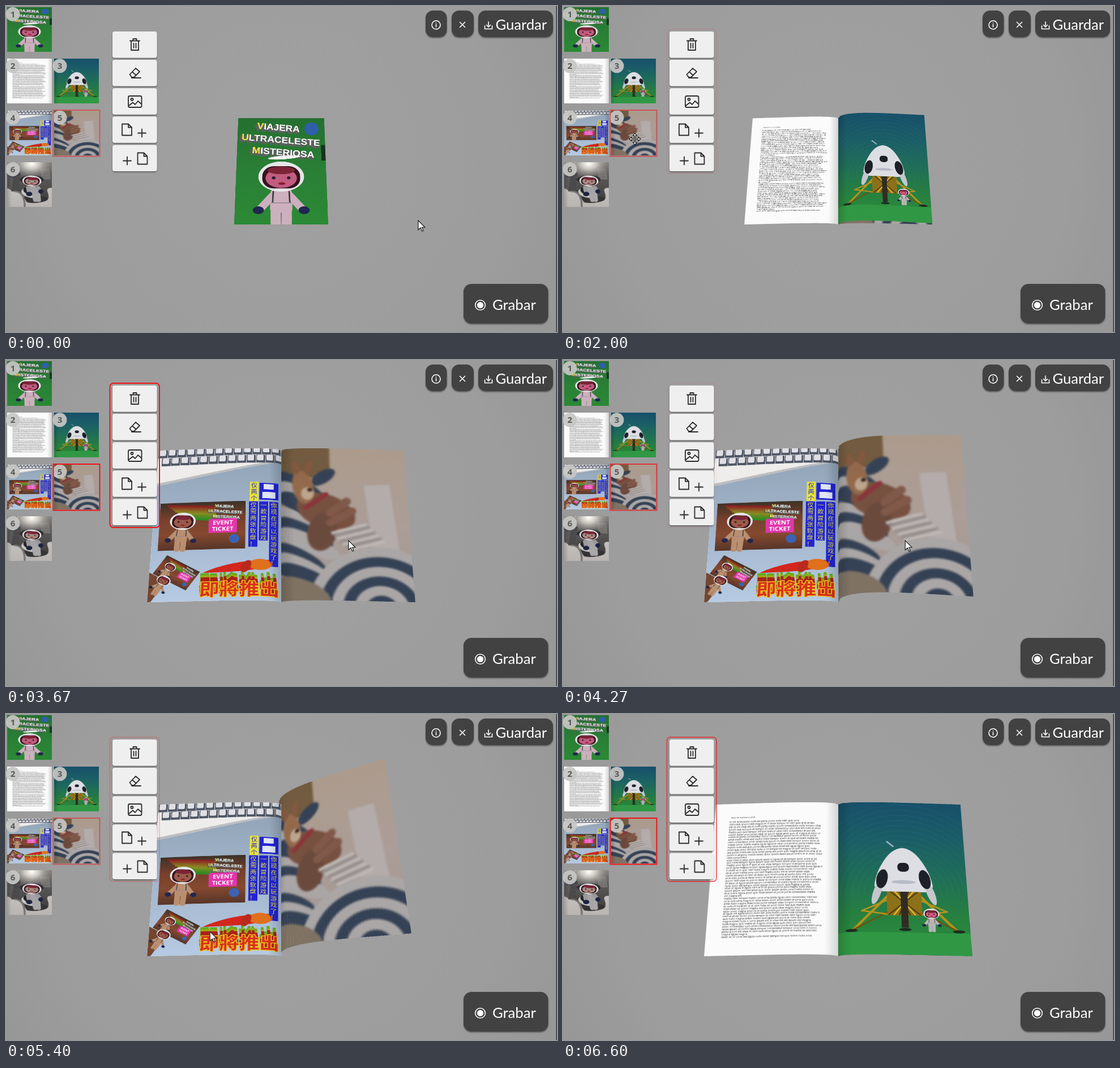
Recreate the animation shown at these times as an HTML page with a canvas. Size 973x576 px, loop 6.67 s.

```html
<!DOCTYPE html>
<html lang="es">
<head>
<meta charset="utf-8">
<title>Editor de libro</title>
<style>
html,body{margin:0;width:100%;height:100%;overflow:hidden;background:#9c9c9c}
canvas,svg{position:absolute;left:0;top:0;display:block}
.big{font:25.6px Lato,"Open Sans",sans-serif;fill:#fff}
.num{font:700 15px "Open Sans",sans-serif;fill:#585858;text-anchor:middle}
.ico{fill:none;stroke:#2b2b2b;stroke-width:1.8;stroke-linejoin:round;stroke-linecap:round}
.lite{fill:none;stroke:#fff;stroke-width:1.6;stroke-linecap:round}
.red{fill:none;stroke:#f01418;stroke-width:2}
</style>
</head>
<body>
<canvas id="stage" width="973" height="576"></canvas>
<svg width="973" height="576">
  <defs>
    <filter id="sh" x="-20%" y="-20%" width="140%" height="150%"><feDropShadow dx="0" dy="1.5" stdDeviation="1.2" flood-opacity=".45"/></filter>
    <path id="sheet" d="M-8-10H3L9-4V10H-8ZM3-10V-4H9"/>
    <path id="plus" d="M-7 0H7M0-7V7"/>
    <path id="arm" d="M-1 0V-6H-3.500L0-10L3.500-6H1V0"/>
  </defs>
  <g id="badges"></g>
  <rect id="pick" class="red" x="83.5" y="184" width="82" height="81.5"/>
  <rect id="frame" class="red" x="183.5" y="41" width="87.5" height="255" rx="6"/>
  <g id="tools" fill="#efefef" filter="url(#sh)"></g>
  <g class="ico">
    <path d="M219 61.500H236M224.500 61V58H230.500V61M221 62V78H234V62M225.500 66V74M229.500 66V74"/>
    <path d="M218.500 121L229 110L236 116L226 126H222ZM223 116.500L230 122.500M222 127H238"/>
    <rect x="216" y="159" width="23.500" height="20" rx="2.500"/><circle cx="222.500" cy="165" r="2"/><path d="M217 176L224 170.500L228 174L233 168L239 173"/>
    <use href="#sheet" x="213" y="218.500"/><use href="#plus" x="240" y="224.500"/>
    <use href="#plus" x="214" y="273.500"/><use href="#sheet" x="240.500" y="269.500"/>
  </g>
  <g fill="#434343" filter="url(#sh)">
    <rect x="741" y="8" width="37.500" height="47" rx="13"/><rect x="787" y="8" width="39" height="47" rx="13"/>
    <rect x="834" y="8" width="132" height="47" rx="13"/><rect x="808" y="491" width="149.500" height="70" rx="14"/>
  </g>
  <g class="lite">
    <circle cx="759.500" cy="33.500" r="7.500"/><path d="M759.500 32.500V37M759.500 29.700V30"/>
    <path d="M801.500 28.500L810.500 37.500M810.500 28.500L801.500 37.500"/>
    <path d="M845.500 35V40.500H858.500V35M852 28V36.500M848.500 33.500L852 37L855.500 33.500"/>
    <circle cx="837.500" cy="528.500" r="8.800"/><circle cx="837.500" cy="528.500" r="4.800" fill="#fff"/>
  </g>
  <text class="big" x="864.500" y="41.800">Guardar</text><text class="big" x="859" y="536.800">Grabar</text>
  <rect x="971.500" width="1.500" height="576" fill="#3a3a3a"/>
  <g id="cursor" fill="#fff" stroke="#111" stroke-width="1.1">
    <path id="arrow" d="M0 0V16.500L4 12.800L6.600 18.800L9 17.800L6.500 12H11.800Z"/>
    <g id="move"></g>
  </g>
</svg>
<script>
const LOOP = 6670, TW = 300, TH = 410, W = 237, H = 324;
const $ = id => document.getElementById(id);
const ctx = $('stage').getContext('2d');
const CJK = '"Noto Sans CJK SC","Noto Sans CJK TC","Noto Sans CJK JP",sans-serif';
const times = (n, fn) => Array.from({ length: n }, (_, i) => fn(i));
const both = fn => [-1, 1].forEach(fn);
let seed = 7;
const rnd = () => (seed = (seed * 16807) % 2147483647) / 2147483647;

// drawing helpers
function surface(w, h, paint) {
  const c = document.createElement('canvas');
  c.width = w; c.height = h;
  paint(c.getContext('2d'));
  return c;
}
function ramp(g, h, ...stops) {
  const r = g.createLinearGradient(0, 0, 0, h);
  stops.forEach((s, i) => r.addColorStop(i / (stops.length - 1), s));
  return r;
}
function box(g, c, x, y, w, h, r = 0) {
  g.fillStyle = c; g.beginPath(); g.roundRect(x, y, w, h, r); g.fill();
}
function oval(g, c, x, y, rx, ry = rx, a = 0) {
  g.fillStyle = c; g.beginPath(); g.ellipse(x, y, rx, ry, a, 0, 7); g.fill();
}
function limb(g, c, w, x0, y0, x1, y1) {
  g.strokeStyle = c; g.lineWidth = w; g.lineCap = 'round';
  g.beginPath(); g.moveTo(x0, y0); g.lineTo(x1, y1); g.stroke();
}
function shape(g, c, d) { g.fillStyle = c; g.fill(new Path2D(d)); }
function at(g, x, y, s, rot, fn) {
  g.save(); g.translate(x, y); g.rotate(rot); g.scale(s, s); fn(g); g.restore();
}
function fill(g, ...stops) { box(g, ramp(g, TH, ...stops), 0, 0, TW, TH); }
function gutter(g, x) {
  const r = g.createLinearGradient(x, 0, Math.abs(x - 30), 0);
  r.addColorStop(0, 'rgba(0,0,0,.16)'); r.addColorStop(1, 'rgba(0,0,0,0)');
  box(g, r, 0, 0, TW, TH);
}

function helmet(g, face) {
  oval(g, '#e6e6e9', 0, 0, 76, 58);
  box(g, '#35141c', -63, -40, 126, 86, 38);
  oval(g, face, 0, 6, 52, 38);
  oval(g, '#7a2436', 0, -24, 46, 15);
  both(s => oval(g, '#22222c', s * 25, 5, 6));
  oval(g, '#8c1f30', 2, 27, 12, 5);
}
function doll(g, suit, face) {
  both(s => {
    limb(g, suit, 27, s * 30, 76, s * 66, 122);
    limb(g, suit, 33, s * 18, 130, s * 17, 190);
    oval(g, '#20264e', s * 74, 130, 18, 15);
  });
  box(g, suit, -36, 50, 72, 90, 14);
  both(s => limb(g, '#3b3942', 5, s * 26, 58, s * 28, 98));
  box(g, '#8f8490', -34, 100, 68, 3);
  helmet(g, face);
}
function title(g) {
  g.textAlign = 'center';
  ['VIAJERA', 'ULTRACELESTE', 'MISTERIOSA'].forEach((word, i) => {
    g.save();
    g.transform(1, .09, -.05, 1, 140 + i * 8, 47 + i * 48);
    g.font = 'bold 34px "Liberation Sans",Arial,sans-serif';
    const left = -g.measureText(word).width / 2;
    g.fillStyle = '#5c625e';
    for (let d = 12; d > 0; d--) g.fillText(word, -d * .7, d * .8);
    g.fillStyle = '#fff'; g.fillText(word, 0, 0);
    g.textAlign = 'left';
    g.fillStyle = '#f5e532'; g.fillText(word[0], left, 0);
    g.restore();
  });
  g.textAlign = 'left';
}

function cover(g) {
  fill(g, '#24702f', '#2a7f36', '#2b8a35');
  box(g, '#17321f', 286, 103, 14, 60);
  title(g);
  oval(g, '#2f5fa8', 255, 41, 25);
  oval(g, '#f4f4f4', 160, 151, 55, 7, -.08);
  at(g, 150, 225, 1, 0, () => doll(g, '#cdb0be', '#c25c80'));
}

function prose(g) {
  fill(g, '#fbfbfb', '#fbfbfb');
  const words = 'lorem ipsum dolor sit amet consectetur elit sed vitae magna tempor nulla at quis nibh porta in urna mattis et ligula'.split(' ');
  g.fillStyle = '#2a2a2a';
  g.font = '5px "Open Sans",sans-serif';
  g.fillText('Nota de la primera salida', 40, 39);
  times(46, i => {
    g.font = '6.2px "Open Sans",sans-serif';
    const limit = i % 15 === 14 ? 70 : 205 + rnd() * 28;
    let line = '', next = '';
    while (g.measureText(next).width < limit) {
      line = next;
      next += words[Math.floor(rnd() * words.length)] + ' ';
    }
    g.fillText(line, 36, 51 + i * 6.9);
  });
  gutter(g, TW);
}

function lander(g) {
  fill(g, '#17506a', '#1b5e66', '#1f6e56', '#27813f', '#2c8c3a');
  g.strokeStyle = 'rgba(120,190,200,.13)';
  times(12, i => { g.beginPath(); g.arc(150, 250, 90 + i * 14, Math.PI, 0); g.stroke(); });
  box(g, '#309844', 0, 350, TW, 60);
  at(g, 152, 0, 1, 0, () => {
    both(s => {
      limb(g, '#b8921c', 6, s * 36, 250, s * 118, 343);
      limb(g, '#6d5310', 4, s * 30, 290, s * 118, 343);
      limb(g, '#b8921c', 4, s * 36, 262, s * 98, 292);
      limb(g, '#b8921c', 4, s * 36, 302, s * 98, 292);
      oval(g, '#1e2a20', s * 122, 345, 14, 4);
    });
    box(g, '#8d701a', -40, 236, 80, 68);
    times(7, i => limb(g, i % 2 ? '#e4bd35' : '#4c3a0c', 3, i * 12 - 36, 236, 36 - i * 12, 302));
    box(g, '#302c24', -8, 235, 16, 102);
    oval(g, '#1e2a20', 0, 342, 14, 4);
    shape(g, '#dcdee3', 'M0 122Q22 124 40 150Q66 190 68 226L60 240H-60L-68 226Q-66 190-40 150Q-22 124 0 122Z');
    both(s => {
      oval(g, '#c4c6cc', s * 62, 242, 9, 34, -s * .3);
      oval(g, '#1d2027', s * 50, 206, 13, 26, -s * .2);
    });
    box(g, '#1d2027', -13, 162, 27, 24, 10);
    oval(g, '#b5bac4', 0, 214, 28, 5);
  });
  limb(g, '#9fb3bd', 4, 130, 118, 116, 106);
  at(g, 213, 298, .24, 0, () => doll(g, '#b9b4b6', '#cf5f82'));
  gutter(g, 0);
}

function ticket(g) {
  box(g, ramp(g, 130, '#3d3226', '#77402c', '#84492f', '#553428'), 0, 0, 202, 128);
  times(8, i => limb(g, `hsl(${i * 16} 60% 34%)`, 6, 20 + i * 6, 8 + i * 5, 130, 14 + i * 5));
  at(g, 110, 2, .3, 0, title);
  at(g, 55, 50, .4, .06, () => doll(g, '#b98f70', '#9c5a48'));
  box(g, '#e235ad', 116, 46, 66, 38);
  g.fillStyle = '#fff'; g.font = 'bold 15px "Open Sans",sans-serif'; g.textAlign = 'center';
  g.fillText('EVENT', 149, 62); g.fillText('TICKET', 149, 79);
  g.textAlign = 'left';
  oval(g, '#3b62b4', 176, 101, 12);
}
function column(g, text, x, y, bg, fg) {
  const step = 17.5;
  box(g, bg, x, y, 21, step * text.length);
  g.fillStyle = fg; g.font = `15px ${CJK}`;
  [...text].forEach((ch, i) => g.fillText(ch, x + 3, y + step * i + 14.5));
}
function poster(g) {
  fill(g, '#8fa2b4', '#a2b5cb', '#b6cae3');
  shape(g, '#eeedec', 'M0 0H300L292 36L0 97Z');
  shape(g, '#bdbdc0', 'M0 90L292 31V36L0 97Z');
  times(26, i => {
    const x = (i >> 1) * 23 + (i % 2) * 9, y = (i % 2) * 22 - x * .02;
    box(g, '#4f5664', x, y, 22, 21); box(g, '#dfdfe4', x + 2, y, 16, 15, 3);
  });
  at(g, 14, 144, 1, -.01, ticket);
  at(g, 38, 284, .45, .55, ticket);
  at(g, 0, 330, .6, .55, () => box(g, '#744630', 0, 0, 80, 130));
  at(g, 34, 352, .22, .5, () => doll(g, '#b98f70', '#9c5a48'));
  const blue = '#2224d2', yellow = '#e6e23a';
  column(g, '仅两个', 225, 90, yellow, blue);
  ['仅需两张软盘！', '一款冒险游戏', '你现在可以玩游戏了！'].forEach((s, i) => column(g, s, 224 + i * 24, 143, blue, yellow));
  box(g, blue, 248, 93, 45, 45);
  box(g, '#dfe6f5', 258, 96, 24, 14); box(g, '#dfe6f5', 255, 117, 31, 17);
  shape(g, '#d3261c', 'M122 334Q180 304 270 300L282 312Q250 334 122 334Z');
  oval(g, '#e0701c', 252, 313, 26, 15);
  oval(g, '#b82a1c', 220, 318, 10, 18, .5);
  g.font = `bold 45px ${CJK}`; g.lineJoin = 'round';
  const word = '即將推出';
  for (let d = 16; d > 0; d--) {
    g.fillStyle = `hsl(${d > 9 ? d * 6 : 4} 75% 38%)`;
    g.fillText(word, 116 - d * .2, 396 - d * 1.5);
  }
  g.strokeStyle = '#f0cc20'; g.lineWidth = 4; g.strokeText(word, 116, 396);
  g.fillStyle = '#d8301c'; g.fillText(word, 116, 396);
  gutter(g, TW);
}

// soft photo of a dog asleep in bed beside a laptop
function nap(g) {
  const navy = '#354255', pale = '#aaa6a6';
  fill(g, '#ac9b8c', '#ab9d97', '#a29894');
  g.filter = 'blur(2.5px)';
  box(g, '#725b40', -5, -5, 122, 85);
  times(9, i => oval(g, i % 2 ? pale : navy, 25 + (i % 3) * 18, 95 + i * 32, 85, 24, .5));
  oval(g, navy, 100, 78, 34, 16, -.6);
  oval(g, '#775140', 105, 170, 72, 45, .4);
  oval(g, '#6b4a3e', 95, 225, 34, 52, .2);
  oval(g, '#93694c', 52, 105, 25, 46, -.2);
  both(s => oval(g, '#83583e', 50 + s * 16, 52, 9, 18, s * .2));
  oval(g, '#bda58c', 62, 122, 15, 17);
  oval(g, '#2a1d18', 68, 112, 6, 5);
  limb(g, '#8c343b', 12, 58, 160, 106, 124);
  times(2, i => limb(g, '#80594a', 20, 115, 175 + i * 25, 155 + i * 12, 142 + i * 26));
  at(g, 198, 98, 1, -.07, () => box(g, '#b3acaa', 0, 0, 62, 185));
  at(g, 115, 225, 1, -.3, () => times(7, i => box(g, i % 2 ? '#96908f' : '#bcb6b3', i * 4, i * 9, 88, 9)));
  times(6, i => {
    g.strokeStyle = i % 2 ? navy : pale; g.lineWidth = 31;
    g.beginPath(); g.ellipse(225, 430, 150 - i * 26, 150 - i * 26, .25, Math.PI, 0); g.stroke();
  });
  oval(g, '#7f7263', 25, 395, 90, 48, .3);
  g.filter = 'none';
  gutter(g, 0);
}

function cabin(g) {
  fill(g, '#85827f', '#5c5a59', '#4a4847', '#3c3b3b');
  const glow = g.createRadialGradient(165, 15, 5, 165, 15, 130);
  glow.addColorStop(0, '#fffdf8'); glow.addColorStop(.35, 'rgba(225,222,215,.8)'); glow.addColorStop(1, 'rgba(160,158,152,0)');
  box(g, glow, 0, 0, TW, 160);
  times(60, () => oval(g, '#eeeeea', rnd() * 80, rnd() * 62, 1 + rnd() * 1.8));
  times(60, i => box(g, '#bdbbb4', 222 + (i % 6) * 10 + i / 5, 62 + (i / 6 | 0) * 10, 6, 4));
  at(g, 0, 90, 1, .1, () => {
    times(8, i => box(g, i % 2 ? '#4a494a' : '#5d5b5c', (i % 2) * 48, (i >> 1) * 42, 44, 38, 4));
    box(g, '#3f4652', 20, 0, 44, 44);
  });
  oval(g, '#2e2d2f', 165, 160, 80, 38); oval(g, '#343334', 190, 345, 90, 38);
  oval(g, '#c9c7c6', 160, 280, 66, 45, .3); oval(g, '#222327', 172, 262, 64, 42, .2);
  times(2, i => {
    limb(g, '#a5a3a5', 36 - i * 6, 165 + i * 18, 235, 168 + i * 30, 288);
    limb(g, '#9c9a9c', 28, 140 + i * 65, 232, 146 + i * 80, 270);
    limb(g, '#a9a7a9', 30, 178 + i * 30, 292, 190 + i * 22, 350);
    oval(g, '#1c2440', 148 + i * 78, 292 - i * 24, 21 - i * 5, 20);
  });
  at(g, 166, 172, .84, .12, () => helmet(g, '#a88a82'));
  shape(g, ramp(g, TH, '#a3a09e', '#c6c3c0', '#b9b5b2'), 'M0 240Q28 250 30 270Q90 250 110 310Q130 372 140 370Q210 382 265 352Q288 330 270 270Q262 232 300 236V410H0Z');
  g.strokeStyle = '#77736f'; g.lineWidth = 13;
  g.stroke(new Path2D('M50 268Q118 270 118 405'));
  gutter(g, 0);
}

const pages = [cover, prose, lander, poster, nap, cabin].map(p => surface(TW, TH, p));
const spots = times(6, i => [i && i % 2 === 0 ? 85 : 2, 2 + 91.3 * Math.ceil(i / 2)]);

const backdrop = surface(973, 576, g => {
  const r = g.createRadialGradient(486, 260, 60, 486, 288, 620);
  r.addColorStop(0, '#a0a0a0'); r.addColorStop(.6, '#9d9d9d'); r.addColorStop(1, '#959595');
  box(g, r, 0, 0, 973, 576);
  g.imageSmoothingQuality = 'high';
  spots.forEach(([x, y], i) => g.drawImage(pages[i], x, y, 79, 79));
});
$('badges').innerHTML = spots.map(([x, y], i) =>
  `<circle cx="${x + 10}" cy="${y + 12.5}" r="12.5" fill="#c6c6c4" opacity=".93"/><text class="num" x="${x + 10}" y="${y + 18}">${i + 1}</text>`).join('');
$('tools').innerHTML = times(5, i => `<rect x="188" y="${45 + i * 50.1}" width="78.500" height="46.500" rx="4"/>`).join('');
$('move').innerHTML = times(4, i => `<use href="#arm" transform="rotate(${i * 90})"/>`).join('');

// motion
function ease(t, from, span) {
  const q = Math.min(1, Math.max(0, (t - from) / span));
  return q * q * (3 - 2 * q);
}
// cursor stops: arrival time, x, y
const stops = [
  [0, 728, 379], [900, 515, 323], [1900, 127, 235], [3050, 838, 330],
  [3670, 605, 319], [4850, 404, 362], [5600, 345, 392], [6330, 330, 600]
];
function pointer(t) {
  let [, x, y] = stops[0];
  for (const [when, px, py] of stops.slice(1)) {
    const e = ease(t, when - 600, 600);
    x += (px - x) * e; y += (py - y) * e;
  }
  return [x, y];
}

function project(x, y, z, zoom) {
  const up = y * .866 + z * .5 - 140, k = 1640 / (1640 + y * .5 - z * .866);
  return [486 + zoom * x * k, 288 - zoom * up * k];
}

// a leaf is drawn as narrow strips, each showing whichever side faces the viewer
function drawLeaf(index, p, shift, base, zoom) {
  const N = 40, w = TW / N;
  const pLow = p + .09 * Math.sin(2 * Math.PI * (p - .5));
  const bend = base + 26 * Math.min(1, p * 25, (1 - p) * 12);
  const edge = (u, y, turn) => {
    const a = Math.PI * turn, n = bend * Math.cos(a) * Math.sin(Math.PI * Math.sqrt(u));
    return project(shift + W * u * Math.cos(a) - n * Math.sin(a), y, W * u * Math.sin(a) + n * Math.cos(a), zoom);
  };
  for (let i = 0; i < N; i++) {
    const u0 = i / N, u1 = (i + 1) / N;
    let tl = edge(u0, H, p), tr = edge(u1, H, p), bl = edge(u0, 0, pLow), br = edge(u1, 0, pLow);
    const front = tr[0] + br[0] > tl[0] + bl[0];
    if (!front) [tl, tr, bl, br] = [tr, tl, br, bl];
    const sx = front ? u0 * TW : (1 - u1) * TW;
    const x0 = Math.max(0, sx - .7), x1 = Math.min(TW, sx + w + .7);
    const ax = [0, 1].map(j => (tr[j] - tl[j] + br[j] - bl[j]) / 2 / w);
    const ay = [0, 1].map(j => (bl[j] - tl[j] + br[j] - tr[j]) / 2 / TH);
    const o = [0, 1].map(j => (tl[j] + tr[j] + bl[j] + br[j]) / 4 - ax[j] * (sx + w / 2) - ay[j] * TH / 2);
    ctx.setTransform(...ax, ...ay, ...o);
    ctx.drawImage(pages[index * 2 + (front ? 0 : 1)], x0, 0, x1 - x0, TH, x0, 0, x1 - x0, TH);
  }
  ctx.setTransform(1, 0, 0, 1, 0, 0);
}

function render(t) {
  ctx.drawImage(backdrop, 0, 0);
  const turn = [
    ease(t, 1100, 800),
    ease(t, 1930, 820) - ease(t, 5600, 670),
    ease(t, 4150, 750) - ease(t, 4930, 670)
  ];
  const zoom = .7 + .3 * ease(t, 2870, 630);
  const shift = W / 2 * (Math.max(0, 2 * turn[2] - 1) - Math.max(0, 1 - 2 * turn[0]));
  const base = 8 * Math.min(1, turn[0] * 4);
  const order = [2, 1, 0].filter(i => turn[i] < .5).concat([0, 1, 2].filter(i => turn[i] >= .5));
  order.forEach(i => drawLeaf(i, turn[i], shift, base, zoom));

  $('frame').style.opacity = .5 - .5 * Math.cos(2 * Math.PI * t / 1050);
  $('pick').style.opacity = .74 + .26 * Math.cos(2 * Math.PI * (t - 3660) / 488);
  const [x, y] = pointer(t), onThumb = x < 166 && y < 266;
  $('cursor').setAttribute('transform', `translate(${x.toFixed(1)} ${y.toFixed(1)})`);
  $('arrow').style.display = onThumb ? 'none' : '';
  $('move').style.display = onThumb ? '' : 'none';
}

const start = performance.now();
function tick() {
  render((performance.now() - start) % LOOP);
  requestAnimationFrame(tick);
}
tick();
</script>
</body>
</html>
```
